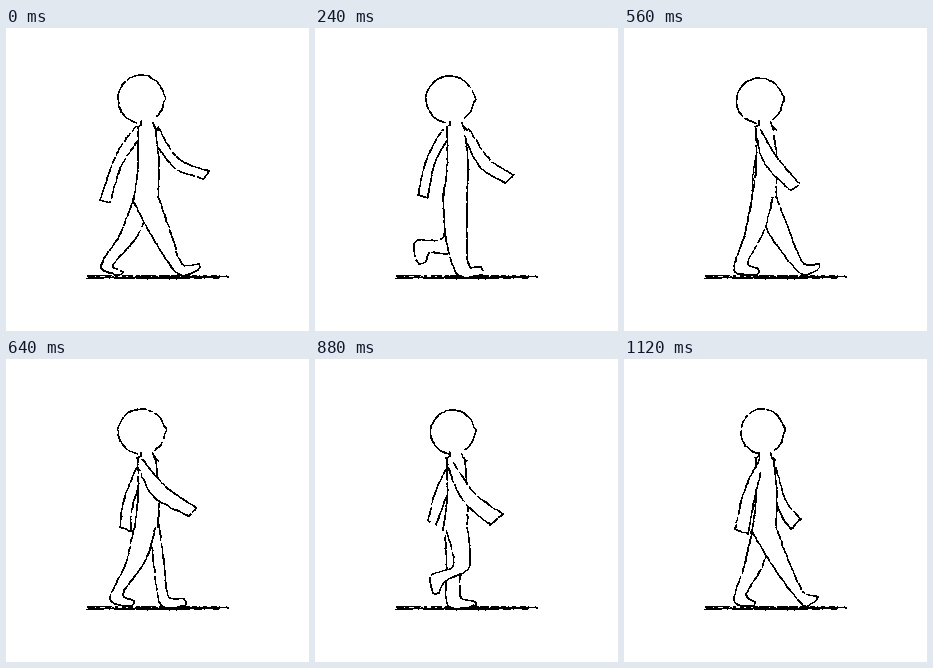
Recreate the animation shown at these times as an HTML page with a canvas. Size 303 by 303 pixels, loop 1200 ms.

```html
<!DOCTYPE html>
<html lang="en">
<head>
<meta charset="utf-8">
<title>Walk cycle</title>
<style>
  html, body { margin: 0; width: 100%; height: 100%; overflow: hidden; background: #fff; }
  canvas { display: block; width: 303px; height: 303px; }
</style>
</head>
<body>
<canvas id="stage" width="303" height="303"></canvas>
<script>
const SIZE = 303, STEP = 80, POSES = 15;
const ctx = document.getElementById('stage').getContext('2d', { willReadFrequently: true });

// Limb tracks: pose index -> outline points x,y.
// Arms: back shoulder, elbow, hand; front hand, elbow, shoulder.
const nearArm = {
  0: [130,98, 110,127, 94,172, 104,175, 115,139, 132,112],
  1: [130,98, 108,127, 90,169, 100,174, 113,140, 132,112],
  3: [128,101, 112,130, 103,167, 113,170, 119,138, 131,113],
  5: [131,100, 127,133, 134,173, 147,171, 142,136, 138,106],
  8: [132,108, 148,138, 183,157, 191,149, 160,128, 136,100],
  10: [134,110, 152,140, 186,160, 199,147, 165,134, 137,102],
  13: [132,106, 138,142, 154,178, 166,171, 152,138, 138,103],
  14: [136,99, 121,130, 111,170, 124,175, 130,143, 137,112]
};
const farArm = {
  0: [153,120, 170,141, 198,151, 203,143, 173,131, 152,99],
  1: [153,120, 171,141, 200,151, 205,143, 175,132, 152,99],
  3: [152,115, 166,140, 190,155, 199,147, 175,132, 154,101],
  5: [150,115, 153,145, 156,172, 167,167, 159,138, 152,101],
  8: [131,108, 118,140, 114,168, 125,172, 126,150, 133,125],
  10: [132,103, 110,133, 94,163, 104,170, 117,147, 135,122],
  13: [140,105, 142,130, 150,160, 156,158, 156,130, 153,101],
  14: [150,132, 156,154, 167,170, 177,160, 162,142, 152,108]
};
// Legs: front hip, knee, ankle, toe top, toe tip; heel, back knee, back hip.
const nearLeg = {
  0: [152,168, 165,205, 176,236, 193,236, 192,242, 172,246, 143,203, 127,172],
  3: [152,160, 152,205, 154,238, 166,239, 167,246, 143,247, 131,210, 128,165],
  5: [146,172, 141,205, 137,235, 148,239, 148,246, 123,246, 123,210, 128,172],
  8: [152,158, 140,200, 117,235, 128,242, 125,247, 104,240, 119,207, 128,170],
  10: [150,158, 146,211, 112,220, 101,234, 93,231, 97,209, 130,205, 128,162],
  13: [152,165, 171,200, 166,226, 170,233, 167,239, 156,231, 156,206, 130,168],
  14: [152,168, 166,205, 180,234, 194,238, 190,243, 180,247, 152,212, 128,172]
};
const farLeg = {
  0: [145,175, 130,210, 107,237, 117,244, 112,247, 95,238, 113,208, 128,170],
  2: [148,165, 135,215, 105,222, 97,234, 89,230, 93,211, 122,200, 130,165],
  3: [150,165, 140,222, 114,225, 111,234, 102,234, 101,213, 128,209, 130,165],
  5: [154,170, 164,193, 146,225, 149,238, 142,236, 138,228, 148,198, 146,175],
  7: [152,168, 166,205, 180,236, 195,236, 193,242, 177,246, 146,207, 130,172],
  8: [153,165, 158,205, 163,238, 178,240, 180,246, 155,246, 148,205, 144,170],
  10: [150,165, 148,210, 152,239, 165,241, 169,246, 140,247, 136,212, 130,180],
  13: [146,172, 141,210, 134,239, 143,243, 144,247, 120,247, 123,212, 131,172],
  14: [150,170, 138,208, 122,236, 131,243, 130,247, 110,242, 120,208, 128,172]
};
// Head: left edge, top edge, right edge.
const head = {
  0: [112,47,158], 1: [111,46,158], 3: [111,48,159], 5: [113,50,158],
  8: [112,50,159], 10: [115,51,159], 13: [117,51,160], 14: [117,50,160]
};

let seed = 1;
function rand() {
  seed = (seed * 16807) % 2147483647;
  return seed / 2147483647;
}

function poseOf(track, pose) {
  const keys = Object.keys(track).map(Number);
  const a = keys.filter(k => k <= pose).pop();
  const b = keys.find(k => k > pose) ?? POSES;
  const t = (pose - a) / (b - a), to = track[b % POSES];
  return track[a].map((v, i) => v + (to[i] - v) * t);
}

const pairs = flat => flat.reduce((out, v, i) => (i % 2 ? out[out.length - 1].push(v) : out.push([v]), out), []);

// Catmull-Rom curve, sampled about every three pixels.
function curve(pts) {
  const out = [pts[0]];
  for (let i = 0; i < pts.length - 1; i++) {
    const p1 = pts[i], p2 = pts[i + 1], p0 = pts[i - 1] || p1, p3 = pts[i + 2] || p2;
    const d = Math.hypot(p2[0] - p1[0], p2[1] - p1[1]);
    const n = Math.max(1, Math.round(d / 3));
    const tangent = (a, b, c) => Math.min(0.5, d / (Math.hypot(b[0] - a[0], b[1] - a[1]) || 1)) * (b[c] - a[c]);
    for (let k = 1; k <= n; k++) {
      const t = k / n, t2 = t * t, t3 = t2 * t;
      out.push([0, 1].map(c =>
        (2 * t3 - 3 * t2 + 1) * p1[c] + (t3 - 2 * t2 + t) * tangent(p0, p2, c) +
        (3 * t2 - 2 * t3) * p2[c] + (t3 - t2) * tangent(p1, p3, c)));
    }
  }
  return out;
}

// Rough pencil line: slight wobble, uneven weight, small gaps.
function sketch(line, weight = 1.5) {
  let last = null;
  for (const [x, y] of line) {
    const p = [x + (rand() - 0.5) * 0.9, y + (rand() - 0.5) * 0.9];
    if (last && rand() > 0.05) {
      ctx.lineWidth = weight + (rand() - 0.5) * 0.9;
      ctx.beginPath();
      ctx.moveTo(...last);
      ctx.lineTo(...p);
      ctx.stroke();
    }
    last = p;
  }
}

function mask(line) {
  ctx.beginPath();
  line.forEach(p => ctx.lineTo(...p));
  ctx.fill();
}

function drawArm(track, pose) {
  const p = pairs(poseOf(track, pose));
  const sides = [p.slice(0, 3), p.slice(2, 4), p.slice(3)].map(curve);
  mask(sides.flat());
  sides.forEach(s => sketch(s));
}

function drawLeg(track, pose) {
  const line = curve(pairs(poseOf(track, pose)));
  mask(line);
  sketch(line);
}

function drawTorso() {
  const back = curve([[132, 99], [132, 140], [128, 172]]);
  const front = curve([[152, 168], [153, 135], [149, 98]]);
  mask([...back, ...front]);
  sketch(back);
  sketch(front);
  sketch(curve([[135, 93], [135, 97], [131, 99]]));
  sketch(curve([[147, 94], [148, 98], [152, 102]]));
}

function drawHead(pose) {
  const [left, top, right] = poseOf(head, pose);
  const cx = (left + right) / 2, cy = (top + 95) / 2;
  const rx = (right - left) / 2, ry = (95 - top) / 2;
  const line = [];
  for (let deg = 100; deg <= 416; deg += 7) {
    const a = deg * Math.PI / 180;
    const nose = deg > 350 && deg < 366 ? 1.5 : 0;
    line.push([cx + rx * Math.cos(a) + nose, cy + ry * Math.sin(a)]);
  }
  sketch(line);
}

function drawGround() {
  seed = 77;
  sketch(curve([[80, 248], [150, 248], [222, 248.5]]), 1.5);
  sketch(curve([[81, 250], [140, 249.5], [214, 249.5]]), 1.4);
  sketch(curve([[108, 250], [150, 250.5], [184, 250.5]]), 1.1);
}

// Hard black and white, without soft edges.
function harden() {
  const img = ctx.getImageData(0, 0, SIZE, SIZE), d = img.data;
  for (let i = 0; i < d.length; i += 4) d[i] = d[i + 1] = d[i + 2] = d[i] < 135 ? 0 : 255;
  ctx.putImageData(img, 0, 0);
}

function draw(pose) {
  ctx.fillStyle = '#fff';
  ctx.strokeStyle = '#000';
  ctx.lineCap = 'round';
  ctx.fillRect(0, 0, SIZE, SIZE);
  drawGround();
  seed = 1000 + pose * 7919;
  drawArm(farArm, pose);
  drawLeg(farLeg, pose);
  drawLeg(nearLeg, pose);
  drawTorso();
  drawArm(nearArm, pose);
  drawHead(pose);
  harden();
}

let shown = -1;
function tick() {
  const pose = Math.floor(performance.now() / STEP) % POSES;
  if (pose !== shown) draw(shown = pose);
  requestAnimationFrame(tick);
}
tick();
</script>
</body>
</html>
```
